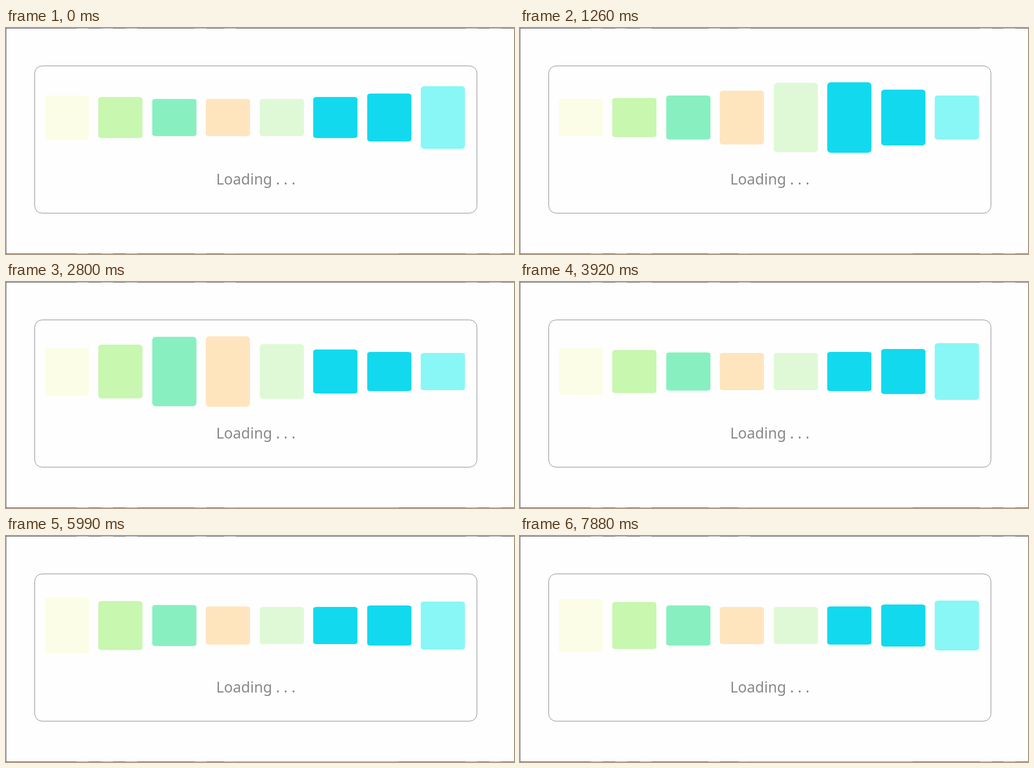
Write an HTML page with a canvas that moves like this. It is 1035 by 462 pixels and loops after 8 s.

```html
<!DOCTYPE html>
<html lang="en">
<head>
<meta charset="utf-8">
<title>Loading</title>
<style>
html, body { margin: 0; width: 100%; height: 100%; overflow: hidden; background: #fefefe; }
canvas { display: block; }
</style>
</head>
<body>
<canvas id="stage" width="1035" height="462"></canvas>
<script>
const ctx = document.getElementById('stage').getContext('2d');
const LOOP = 8000;
const COLORS = ['#fbfde6', '#c8f7b0', '#88f0c0', '#ffe5be', '#dff9d7', '#12d9ee', '#12d9ee', '#88f7f6'];
const BAR = { left: 79, right: 845, width: 90, height: 150, radius: 7, mid: 183 };

// Wave crest in bar units: start position, speed per ms, distance between crests
const CREST = 8.02, SPEED = 0.005184, SPAN = 10;

// Key points [time, step number]; steps are even in between
const PACE = [[0, 0], [3920, 28], [5060, 37], [5990, 44], [7880, 58]];

// The pose holds still until the next step
function heldTime(t) {
  const i = PACE.findIndex(p => p[0] > t);
  if (i < 0) return PACE.at(-1)[0];
  const [t0, n0] = PACE[i - 1], [t1, n1] = PACE[i];
  const step = (t1 - t0) / (n1 - n0);
  return t0 + Math.floor((t - t0) / step + 1e-6) * step;
}

// cubic-bezier(.25, .1, .25, 1)
function ease(x) {
  let lo = 0, hi = 1;
  const curve = (a, b, s) => 3 * a * s * (1 - s) ** 2 + 3 * b * s * s * (1 - s) + s ** 3;
  for (let i = 0; i < 24; i++) {
    const s = (lo + hi) / 2;
    if (curve(0.25, 0.25, s) < x) lo = s; else hi = s;
  }
  return curve(0.1, 1, lo);
}

// Half height in whole pixels; the first bar trails the second by half a place
function barHalf(i, t) {
  const place = i || 0.5;
  const d = (((CREST + SPEED * t - place) % SPAN) + SPAN) % SPAN;
  const scale = 1 - 0.5 * ease(Math.min(d, SPAN - d) / (SPAN / 2));
  return Math.round(BAR.height / 2 * scale);
}

function drawBar(i, t) {
  const x = Math.round(BAR.left + (BAR.right - BAR.left) * i / 7);
  ctx.save();
  ctx.translate(x, BAR.mid);
  ctx.scale(1, barHalf(i, t) / (BAR.height / 2));
  ctx.beginPath();
  ctx.roundRect(0, -BAR.height / 2, BAR.width, BAR.height, BAR.radius);
  ctx.fillStyle = COLORS[i];
  ctx.fill();
  ctx.restore();
}

function fill(color, x, y, w, h) {
  ctx.fillStyle = color;
  ctx.fillRect(x, y, w, h);
}

function drawEdges() {
  fill('#808080', 0, 0, 1, 462);
  for (const y of [0, 461]) {
    fill('#4a4a4a', 0, y, 1035, 1);
    for (const x of [144, 194, 244, 384, 445, 937, 985]) fill('#8c8c8c', x, y, 24, 1);
  }
  fill('#808080', 470, 461, 330, 1);
}

function drawPanel() {
  ctx.beginPath();
  ctx.roundRect(58.5, 77.5, 901, 301, 15);
  ctx.strokeStyle = '#808080';
  ctx.lineWidth = 1;
  ctx.stroke();
  ctx.font = '30px "Noto Sans", "Open Sans", sans-serif';
  ctx.textAlign = 'center';
  ctx.fillStyle = '#888';
  ctx.fillText('Loading . . .', 509, 320);
}

function draw() {
  const t = heldTime(performance.now() % LOOP);
  fill('#fefefe', 0, 0, 1035, 462);
  drawEdges();
  drawPanel();
  COLORS.forEach((_, i) => drawBar(i, t));
  requestAnimationFrame(draw);
}
draw();
</script>
</body>
</html>
```
